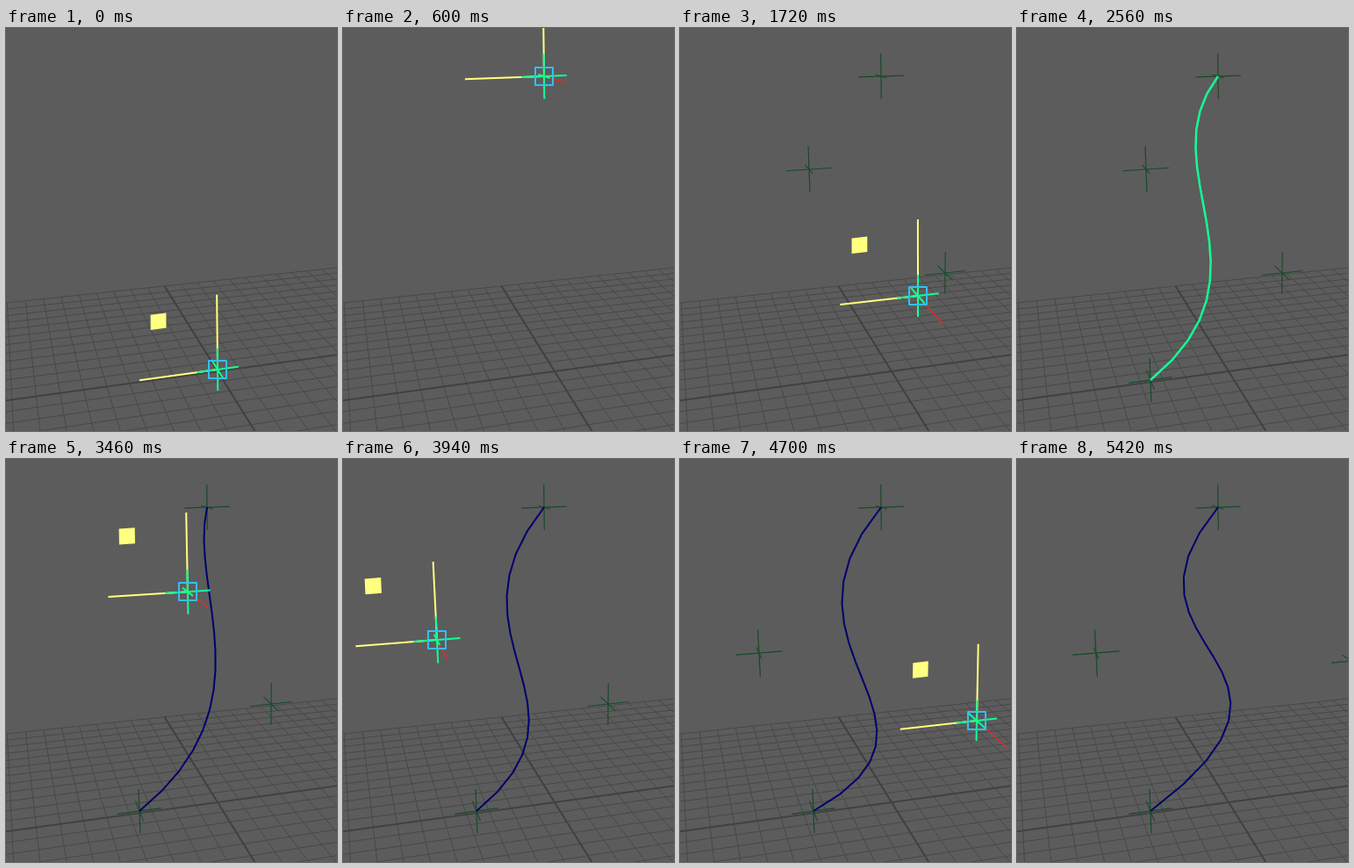
Write an HTML page with a canvas that moves like this. It is 377x459 px and loops after 5.78 s.

```html
<!DOCTYPE html>
<html lang="en">
<head>
<meta charset="utf-8">
<title>Curve driven by locators</title>
<style>
  html, body { margin: 0; width: 100%; height: 100%; overflow: hidden; background: #5c5c5c; }
  canvas { display: block; }
</style>
</head>
<body>
<canvas id="stage" width="377" height="459"></canvas>
<script>
const ctx = document.getElementById('stage').getContext('2d');
const LOOP = 5780;
const COLORS = {
  back: '#5c5c5c', grid: '#484848', axis: '#414141',
  idle: '#174a2a', picked: '#12ff94', curve: '#00006c',
  handle: '#ffff80', depth: '#e02c32', box: '#36bdf5'
};

// Vanishing points of the three world axes on screen.
const VANISH = { x: [3547, -65], y: [273, 3600], z: [-15, -20] };

// Each move: locator index, time of selection and release, keys [time, x, y].
const MOVES = [
  { id: 0, on: 0, off: 660, keys: [[60, 241, 389], [330, 193, 225], [600, 229, 55]] },
  { id: 1, on: 660, off: 1240, keys: [[600, 229, 55], [1180, 147, 161]] },
  { id: 2, on: 1240, off: 1660, keys: [[1180, 147, 161], [1600, 302, 279]] },
  { id: 3, on: 1660, off: 2500, keys: [[1660, 302, 279], [1720, 271, 305], [1780, 189, 362],
      [1960, 136, 388], [2200, 146, 395], [2440, 152, 401]] },
  { id: 1, on: 3220, off: 4120, keys: [[3220, 147, 161], [3440, 210, 150], [3760, 88, 190],
      [3940, 107, 206], [4060, 90, 221]] },
  { id: 2, on: 4120, off: 5180, keys: [[4120, 302, 279], [4340, 345, 200], [4480, 232, 138],
      [4700, 338, 298], [4940, 368, 252], [5180, 381, 230]] }
];
const CURVE_ON = 2560, CURVE_OFF = 3220, LAST_IDLE = 5420;

// Cubic Hermite through timed keys, at rest at both ends.
function follow(keys, t) {
  const last = keys.length - 1;
  if (t <= keys[0][0]) return keys[0].slice(1);
  if (t >= keys[last][0]) return keys[last].slice(1);
  let i = 0;
  while (t >= keys[i + 1][0]) i++;
  const a = keys[i], b = keys[i + 1], span = b[0] - a[0], u = (t - a[0]) / span;
  const slope = (k, c) => k === 0 || k === last ? 0
    : (keys[k + 1][c] - keys[k - 1][c]) / (keys[k + 1][0] - keys[k - 1][0]) * span;
  return [1, 2].map(c =>
    a[c] * (1 + 2 * u) * (1 - u) ** 2 + b[c] * u * u * (3 - 2 * u) +
    slope(i, c) * u * (1 - u) ** 2 - slope(i + 1, c) * u * u * (1 - u));
}

function step(t) {
  const base = t < 1180 ? 0 : t < 4640 ? 1180 : 4640;
  return base + Math.floor((t - base) / 60) * 60;
}

function stroke(points, color, width) {
  ctx.strokeStyle = color;
  ctx.lineWidth = width;
  ctx.beginPath();
  points.forEach(p => ctx.lineTo(p[0], p[1]));
  ctx.stroke();
}

const shift = (p, v, k) => [p[0] + v[0] * k, p[1] + v[1] * k];

function toward(p, target, length) {
  const dx = target[0] - p[0], dy = target[1] - p[1], d = Math.hypot(dx, dy);
  return [dx / d * length, dy / d * length];
}

function ground(x, z) {
  const w = 1 + 0.00735 * x + 0.0258 * z;
  return [241 + (24.3 * x - 6.6 * z) / w, 391 - (3.35 * x + 10.6 * z) / w];
}

function drawGrid() {
  for (let i = -12; i <= 12; i++) {
    if (!i) continue;
    stroke([ground(i, -12), ground(i, 12)], COLORS.grid, 1);
    stroke([ground(-12, i), ground(12, i)], COLORS.grid, 1);
  }
  stroke([ground(0, -12), ground(0, 12)], COLORS.axis, 2);
  stroke([ground(-12, 0), ground(12, 0)], COLORS.axis, 2);
}

function drawLocator(p, color, width) {
  const size = 29 - 0.013 * p[0] - 0.005 * p[1];
  const depth = [p[0] - VANISH.z[0], p[1] - VANISH.z[1]];
  const arms = [toward(p, VANISH.x, size), toward(p, VANISH.y, size), shift([0, 0], depth, 0.027)];
  arms.forEach(v => stroke([shift(p, v, -1), shift(p, v, 1)], color, width));
}

function drawHandles(p, showDepth) {
  const hx = toward(p, VANISH.x, -(95.2 - 0.022 * p[0]));
  const hy = toward(p, VANISH.y, -(93.5 - 0.021 * p[1]));
  const hz = [p[0] - VANISH.z[0], p[1] - VANISH.z[1]];
  if (showDepth) stroke([p, shift(p, hz, 0.1)], COLORS.depth, 1.5);
  stroke([p, shift(p, hx, 1)], COLORS.handle, 2);
  stroke([p, shift(p, hy, 1)], COLORS.handle, 2);

  const corner = (a, b) => shift(shift(p, hx, a), hy, b);
  ctx.fillStyle = COLORS.handle;
  ctx.beginPath();
  [[0.65, 0.65], [0.85, 0.65], [0.85, 0.85], [0.65, 0.85]]
    .forEach(([a, b]) => ctx.lineTo(...corner(a, b)));
  ctx.fill();

  drawLocator(p, COLORS.picked, 2);
  ctx.strokeStyle = COLORS.box;
  ctx.lineWidth = 2;
  ctx.strokeRect(Math.round(p[0]) - 10, Math.round(p[1]) - 10, 20, 20);
}

function drawCurve(pts, color, width) {
  const line = [];
  for (let i = 0; i <= 16; i++) {
    const u = i / 16, v = 1 - u;
    const weights = [v ** 3, 3 * u * v * v, 3 * u * u * v, u ** 3];
    line.push([0, 1].map(c => weights.reduce((sum, w, k) => sum + w * pts[k][c], 0)));
  }
  stroke(line, color, width);
}

function draw(t) {
  ctx.fillStyle = COLORS.back;
  ctx.fillRect(0, 0, 377, 459);
  drawGrid();

  const spots = [];
  let picked = -1;
  for (const m of MOVES) {
    if (t < m.on) break;
    spots[m.id] = follow(m.keys, t);
    if (t < m.off) picked = m.id;
  }

  ctx.lineJoin = 'round';
  spots.forEach((p, id) => {
    if (id === picked) return;
    const fresh = id === 2 && t >= 5180 && t < LAST_IDLE;
    drawLocator(p, fresh ? COLORS.picked : COLORS.idle, fresh ? 2 : 1.2);
  });
  if (t >= CURVE_ON) {
    const live = t < CURVE_OFF;
    drawCurve(spots, live ? COLORS.picked : COLORS.curve, live ? 2.5 : 2);
  }
  if (picked >= 0) drawHandles(spots[picked], t >= 60);
}

const start = performance.now();
function frame() {
  draw(step((performance.now() - start) % LOOP));
  requestAnimationFrame(frame);
}
frame();
</script>
</body>
</html>
```
